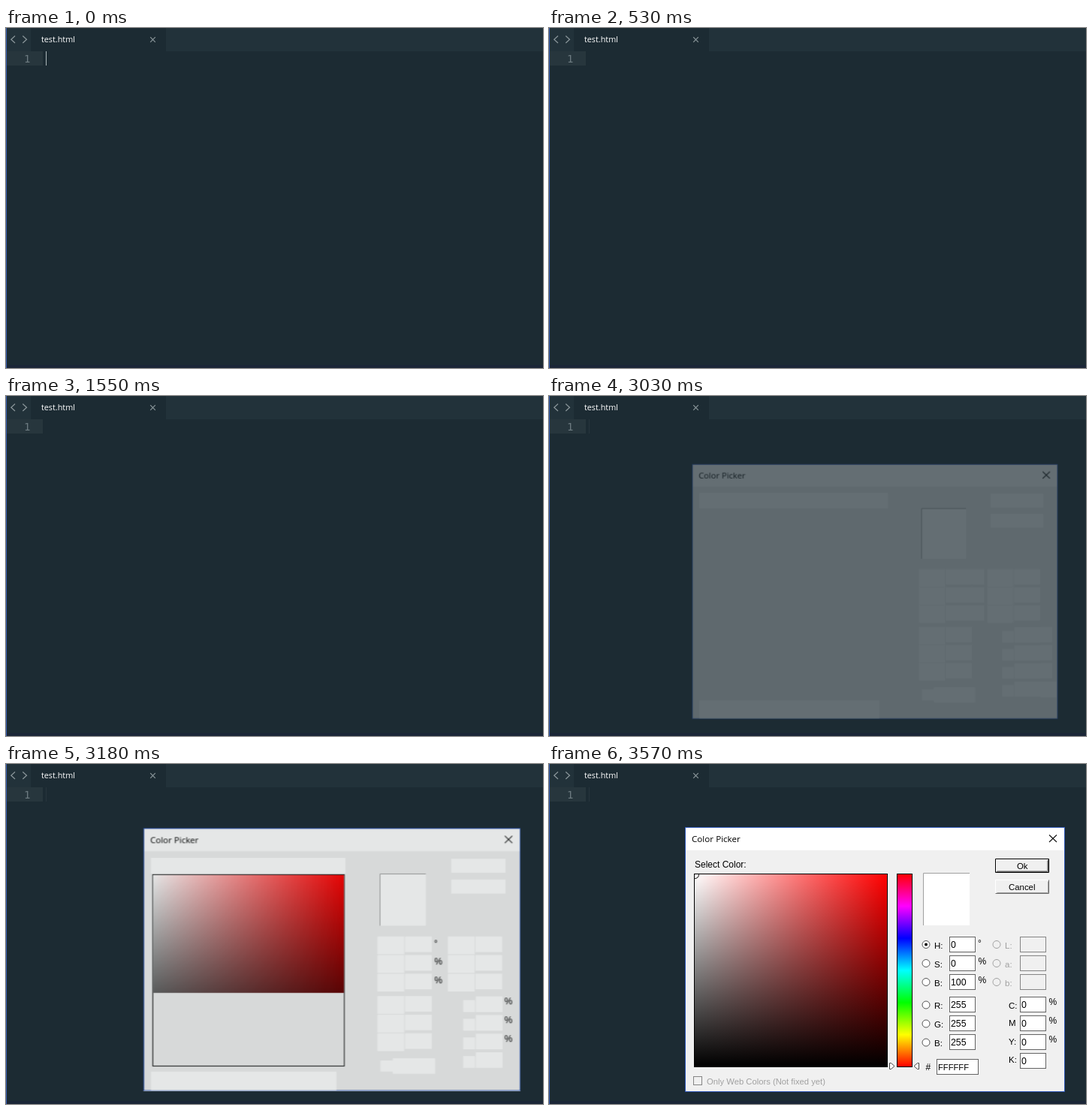
Recreate the animation shown at these times as an HTML page. Size 715 by 453 pixels, loop 5.74 s.

```html
<!DOCTYPE html>
<html lang="en">
<head>
<meta charset="utf-8">
<title>Color picker</title>
<style>
  html, body { margin: 0; width: 100%; height: 100%; overflow: hidden; background: #1c2b33; }
  svg { display: block; width: 715px; height: 453px; }
  text { font-family: "Liberation Sans", Arial, sans-serif; font-size: 11.5px; white-space: pre; }
  .ui { font-family: "Open Sans", "Noto Sans", sans-serif; }
  .mono { font-family: "DejaVu Sans Mono", monospace; }
  .crisp { shape-rendering: crispEdges; }

  .caret, .dialog, .first, .symbols, .field, .hue, .blanks, .controls, .markers {
    animation: 5740ms step-end infinite;
  }
  .caret { animation-name: blink; }
  .dialog { animation-name: open; transform-origin: 434px 260.5px; }
  .first { animation-name: first; }
  .symbols { animation-name: symbols; }
  .field { animation-name: paint; }
  .hue { animation-name: hue; }
  .blanks { animation-name: blanks; }
  .controls { animation-name: controls; }
  .markers { animation-name: markers; }

  @keyframes blink {
    0% { opacity: .8; }
    1.219% { opacity: 1; }
    6.794% { opacity: .5; }
    9.233% { opacity: 0; }
    16.202% { opacity: .5; }
    18.815% { opacity: 1; }
    25.435% { opacity: .5; }
    27.003% { opacity: 0; }
    52.787%, 100% { opacity: .06; }
  }
  @keyframes open {
    0% { opacity: 0; transform: scale(.9625); }
    52.787% { opacity: .32; transform: scale(.9625); }
    54.181% { opacity: .665; transform: scale(.982); }
    55.401% { opacity: .887; transform: scale(.992); }
    56.794% { opacity: .985; transform: scale(.998); }
    58.188%, 100% { opacity: 1; transform: none; }
  }
  @keyframes first { 0% { opacity: 1; } 54.181%, 100% { opacity: 0; } }
  @keyframes symbols { 0% { opacity: 0; } 54.181%, 100% { opacity: 1; } }
  @keyframes paint {
    0% { clip-path: inset(0 0 100% 0); }
    54.181% { clip-path: inset(0 0 80% 0); }
    55.401% { clip-path: inset(0 0 38.5% 0); }
    56.794%, 100% { clip-path: inset(0 0 0 0); }
  }
  @keyframes hue { 0% { opacity: 0; } 58.188%, 100% { opacity: 1; } }
  @keyframes blanks { 0% { opacity: 1; } 59.582%, 100% { opacity: 0; } }
  @keyframes controls { 0% { opacity: 0; } 59.582%, 100% { opacity: 1; } }
  @keyframes markers { 0% { opacity: 0; } 60.801%, 100% { opacity: 1; } }
</style>
</head>
<body>
<svg viewBox="0 0 715 453">
  <defs>
    <linearGradient id="sat">
      <stop stop-color="#fff"/><stop offset="1" stop-color="#f00"/>
    </linearGradient>
    <linearGradient id="val" x2="0" y2="1">
      <stop stop-opacity="0"/><stop offset="1"/>
    </linearGradient>
    <linearGradient id="spectrum" x2="0" y2="1">
      <stop stop-color="#f00"/><stop offset=".1667" stop-color="#f0f"/>
      <stop offset=".3333" stop-color="#00f"/><stop offset=".5" stop-color="#0ff"/>
      <stop offset=".6667" stop-color="#0f0"/><stop offset=".8333" stop-color="#ff0"/>
      <stop offset="1" stop-color="#f00"/>
    </linearGradient>
    <clipPath id="inside"><rect x="194" y="147" width="256" height="256"/></clipPath>
  </defs>

  <!-- Editor -->
  <g class="crisp">
    <rect width="715" height="453" fill="#1c2b33"/>
    <rect width="715" height="31" fill="#22323a"/>
    <rect x="33" width="180" height="31" fill="#1c2b33"/>
    <rect x="1" y="31" width="48" height="19" fill="#27363d"/>
    <rect y="449" width="715" height="4" fill="#1b2637"/>
    <rect width="1" height="453" fill="#3a60b4"/>
  </g>
  <g fill="none" stroke="#8b979b" stroke-width="1.2">
    <path d="M12 10.5L6.8 15.2L12 20M22.3 10.5L27.5 15.2L22.3 20"/>
    <path d="M192.2 12.2l6.6 6.6m0-6.6l-6.6 6.6"/>
  </g>
  <text class="ui" x="47" y="19" fill="#fff" style="font-size:10.8px">test.html</text>
  <text class="mono" x="24" y="46" fill="#6d7b81" style="font-size:14px">1</text>
  <rect class="caret crisp" x="53" y="31" width="1" height="19" fill="#d2dddd"/>

  <!-- Dialog -->
  <g class="dialog">
    <rect x="181" y="84" width="506" height="353" fill="#3059b8"/>
    <rect x="182" y="85" width="504" height="351" fill="#f0f0f0"/>
    <rect x="182" y="85" width="504" height="30" fill="#fff"/>
    <text class="ui" x="190" y="104" style="font-size:11.65px">Color Picker</text>
    <path d="M666 94.5l10 9.5m0-9.5l-10 9.5" stroke="#111" stroke-width="1.1"/>

    <g class="blanks" id="blanks" fill="#fff"><g class="first" id="first"></g></g>
    <rect x="498" y="145" width="62" height="70" fill="#fff"/>
    <path d="M498.5 215V145.5H560" fill="none" stroke="#a0a0a0"/>

    <rect class="symbols" x="193.5" y="146.5" width="257" height="257" fill="#f0f0f0" stroke="#000"/>
    <g class="field">
      <rect x="194" y="147" width="256" height="256" fill="url(#sat)"/>
      <rect x="194" y="147" width="256" height="256" fill="url(#val)"/>
    </g>
    <rect class="hue" x="463.5" y="146.5" width="20" height="257" fill="url(#spectrum)" stroke="#000"/>
    <g class="symbols" id="symbols"></g>
    <g class="controls" id="controls"></g>
    <g class="markers" fill="#fff" stroke="#444">
      <path d="M453.5 398.5h2l4.5 4l-4.5 4h-2zM492.5 398.5h-2l-4.5 4l4.5 4h2z"/>
      <circle cx="194.5" cy="147.5" r="5" fill="none" stroke="#000" clip-path="url(#inside)"/>
    </g>
  </g>
</svg>

<script>
  const GRAY = '#a0a0a0';
  const topRows = [230, 255, 280], lowRows = [310, 335, 360];
  const layer = id => document.getElementById(id);
  const symbols = layer('symbols'), controls = layer('controls');

  function add(parent, tag, attrs, content = '') {
    const el = document.createElementNS('http://www.w3.org/2000/svg', tag);
    for (const key in attrs) el.setAttribute(key, attrs[key]);
    el.textContent = content;
    parent.append(el);
  }

  const blank = (x, y, width, height, id = 'blanks') =>
    add(layer(id), 'rect', { x, y, width, height });

  const label = (x, y, str, size = 11.5, fill = '#000', parent = controls) =>
    add(parent, 'text', { x, y, fill, style: `font-size:${size}px` }, str);

  const path = (d, stroke) => add(controls, 'path', { d, stroke, fill: 'none' });

  function input(x, y, str, width = 35, size = 12.3) {
    add(controls, 'rect', {
      x: x + .5, y: y + .5, width: width - 1, height: 20,
      fill: str ? '#fff' : '#f0f0f0', stroke: str ? '#646464' : '#858585'
    });
    label(x + 2, y + 15, str, size);
  }

  function radio(cx, cy, on, stroke) {
    add(controls, 'circle', { cx, cy, r: 5, fill: stroke === GRAY ? '#f0f0f0' : '#fff', stroke });
    if (on) add(controls, 'circle', { cx, cy, r: 2 });
  }

  function button(y, str, x, strong) {
    const at = (l, t, w, h) => `M${l} ${t + h}V${t}h${w}`;
    const back = (l, t, w, h) => `M${l} ${t + h}h${w}v${-h}`;
    path(at(594.5, y + .5, 71, 18), strong ? '#000' : '#fff');
    path(back(594.5, y + .5, 71, 18), strong ? '#000' : '#696969');
    if (strong) {
      path(at(595.5, y + 1.5, 69, 16), '#fff');
      path(back(595.5, y + 1.5, 69, 16), '#696969');
    }
    path(back(596.5, y + 2.5, strong ? 67 : 68, strong ? 14 : 15), GRAY);
    label(x, y + 14, str, 11.4);
  }

  // Unpainted control areas
  blank(191, 124, 261, 21);
  blank(191, 411, 249, 25);
  blank(594, 125, 73, 19);
  blank(594, 153, 73, 19);
  topRows.forEach((y, i) => {
    for (const x of [495, 589.5]) {
      blank(x, y - .5, 36, 24);
      blank(x + 37, y - .5, 36, 21);
    }
    blank(568, y - .5, 17, 21, 'first');
    blank(495, lowRows[i] - .5, 36, 24);
    blank(532, lowRows[i] - .5, 36, 21);
    blank(663, lowRows[i] - .5, 16, 21, 'first');
  });
  [...lowRows, 385].forEach(y => {
    blank(610, y + 5, 16, 16);
    blank(627, y, 36, 21);
  });
  blank(663, 385, 22, 22, 'first');
  blank(499, 396, 17, 15);
  blank(515.5, 393, 57, 21);

  // Unit signs
  label(571, 243, '°', 12, '#000', symbols);
  for (const y of [267, 292]) label(571.5, y, '%', 12, '#000', symbols);
  for (const y of [321, 346, 371]) label(665.5, y, '%', 12, '#000', symbols);

  // Finished controls
  label(194, 138, 'Select Color:', 12);
  button(126, 'Ok', 623, true);
  button(154, 'Cancel', 612, false);

  ['H:', 'S:', 'B:'].forEach((name, i) => {
    const y = topRows[i];
    radio(502, y + 10.5, i === 0, '#555');
    label(513, y + 16, name);
    input(533, y, ['0', '0', '100'][i]);
    radio(596, y + 10.5, false, GRAY);
    label(607, y + 16, ['L:', 'a:', 'b:'][i], 11.5, GRAY);
    input(627, y, '');
  });
  ['R:', 'G:', 'B:'].forEach((name, i) => {
    const y = lowRows[i];
    radio(502, y + 11, false, '#555');
    label(513, y + 16, name);
    input(533, y, '255');
  });
  ['C:', 'M', 'Y:', 'K:'].forEach((name, i) => {
    label(612, [326, 349, 374, 398][i], name);
    input(627, 310 + i * 25, '0');
  });
  label(501.5, 408, '#', 12);
  input(516, 393, 'FFFFFF', 56, 11.2);

  add(controls, 'rect', { x: 192.5, y: 416.5, width: 11, height: 11, fill: '#f0f0f0', stroke: '#858585' });
  label(210, 427, 'Only Web Colors (Not fixed yet)', 11.25, GRAY);
</script>
</body>
</html>
```
